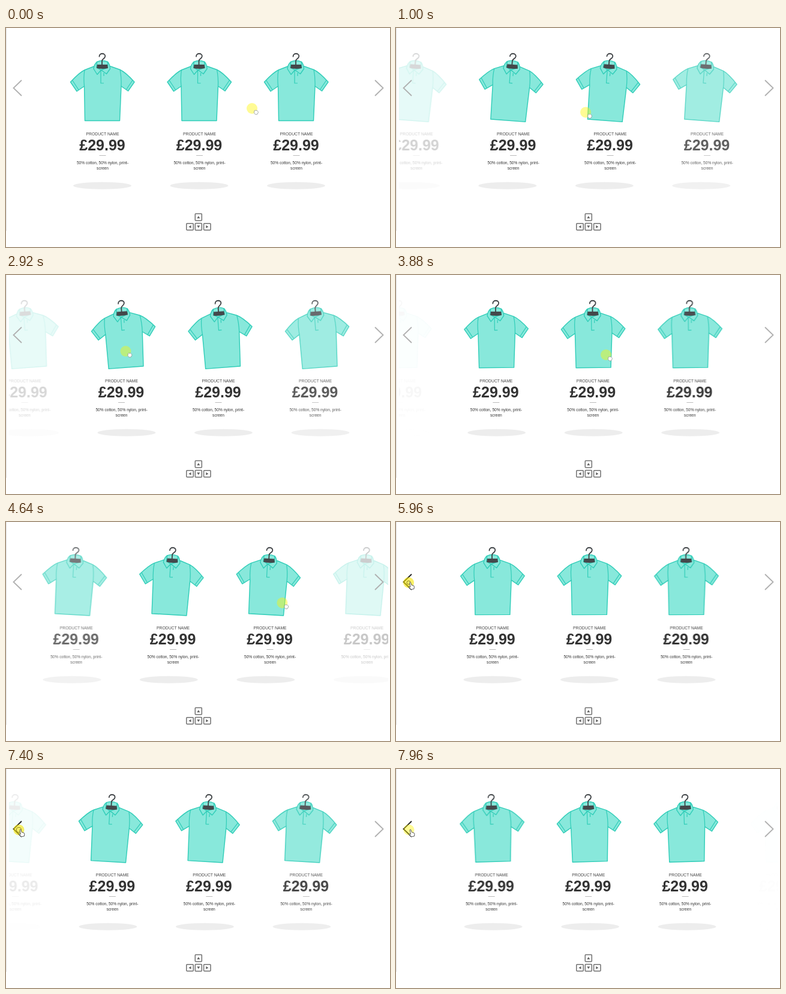
These frames come from a looping animation (640x365 px, 8000 ms). An HTML page:

```html
<!DOCTYPE html>
<html lang="en">
<head>
<meta charset="utf-8">
<title>Swinging product carousel</title>
<style>
  html, body { margin: 0; width: 100%; height: 100%; overflow: hidden; background: #fff; }
  svg { display: block; width: 640px; height: 365px; }
  text { font-family: "Liberation Sans", Arial, sans-serif; text-anchor: middle; fill: #333; }
  .name { font-size: 6.8px; fill: #444; }
  .price { font-size: 25px; font-weight: bold; }
  .note { font-size: 6.6px; }
  .shirt path { fill: #88e8db; stroke: #30cdb8; stroke-width: 1.4; stroke-linejoin: round; }
  .shirt .seam { fill: none; stroke-width: 1.2; }
  .shirt .bar { fill: #44484b; stroke: none; }
  .shirt .hook { fill: none; stroke: #3f4346; stroke-width: 1.8; stroke-linecap: round; }
  .arrow { fill: none; stroke: #b0b0b0; stroke-width: 1.8; }
  .key rect { fill: #fff; stroke: #707070; stroke-width: 1.5; }
  .key path { fill: #606060; }
  .hand { fill: #fff; stroke: #333; stroke-width: .8; stroke-linejoin: round; }
</style>
</head>
<body>
<svg viewBox="0 0 640 365">
  <defs>
    <clipPath id="stage"><rect x="5" y="0" width="632" height="300"/></clipPath>
    <!-- Coordinates are relative to the centre line of one product -->
    <g id="shirt" class="shirt">
      <path d="M-14 64L-29.500 70Q-38 74-53 90L-42.500 105.500L-30 97L-29 154.500H29L31.500 97L43 105L53.500 90Q39 74 29.500 69.500L14 64Z"/>
      <path class="seam" d="M-29.500 70Q-31.500 82-30 97M29.500 69.500Q32 82 31.500 97M-50 87L-39.500 103M50.500 87L40 102.500"/>
      <path d="M-9 56.500Q0 52.500 9 56.500L10 70H-11Z"/>
      <path d="M-9 56.500Q-13.500 60-14.500 68L-8.500 77.500L-2 70L-9.500 66Z"/>
      <path d="M9 56.500Q12.500 60 13 68L7 76.500L-2 70L9 66Z"/>
      <path class="bar" d="M-8.500 61H8.500L9.500 67Q0 69-9.500 67Z"/>
      <path class="hook" d="M-5 47.500C-5 41 5 41.500 4.800 47C4.500 51.500-.5 51-.5 55V61"/>
      <path class="seam" d="M-2.500 71V92H2.500M2.500 75V80"/>
    </g>
    <g id="label">
      <text class="name" x=".5" y="179">PRODUCT NAME</text>
      <text class="price" y="204">£29.99</text>
      <path d="M-5 212.500H6" stroke="#bbb"/>
      <text class="note" x=".5" y="227.300">50% cotton, 50% nylon, print-</text>
      <text class="note" x=".5" y="236.300">screen</text>
    </g>
    <g id="key" class="key">
      <rect x="-5.500" y="-5.700" width="11" height="11.400" rx="1"/>
      <path d="M-2.500 2L0-2L2.500 2Z"/>
    </g>
  </defs>

  <path d="M.5 0V338" stroke="#e2e2e2"/>
  <g id="items" clip-path="url(#stage)"></g>
  <use href="#key" transform="translate(320.800 315.300)"/>
  <use href="#key" transform="translate(306.500 331.200) rotate(-90)"/>
  <use href="#key" transform="translate(320.800 331.200) rotate(180)"/>
  <use href="#key" transform="translate(335.300 331.200) rotate(90)"/>
  <path id="prev" class="arrow" d="M26 87L12.500 100L26 113"/>
  <path class="arrow" d="M615 87L628.500 100L615 113"/>
  <g id="pointer">
    <circle id="halo" r="9"/>
    <circle id="ring" fill="none" stroke="#7d7420" stroke-width=".9"/>
    <path id="finger" class="hand" d="M1.500 0Q2.500-1.300 3.500 0L4.800 4L8.500 5Q10 6 9 10.500L4 11.500L0 7Q0 5.500 3 7.500Z"/>
    <path id="fist" class="hand" style="stroke:#8b9494" d="M4 4Q5 2.500 6.500 3.500Q8.500 2.500 9.500 4.500L10.500 6.500L8.500 10H5.500L3.500 7.500Z"/>
  </g>
</svg>
<script>
const LOOP = 8000, GAP = 161.5, FIRST = 160.5;
const SWING = { perPixel: .05, period: 960, decay: 450 };
const $ = id => document.getElementById(id);
const clamp = v => Math.max(0, Math.min(1, v));

const slide = at => ({ at, time: 740, way: GAP });
const moves = [
  slide(880),
  { at: 2100, time: 460, way: -43 },            // slow drag to the left
  { at: 2580, time: 340, way: -248.5 },         // quick flick
  { at: 3440, time: 860, way: 291.5 - 2 * GAP },  // release: snap to the next slot
  slide(4320), slide(5964), slide(7324)
];
const clicks = [5920, 7320];
const stops = [
  { at: 0, x: 410, y: 134 },
  { at: 880, x: 310, y: 140 },
  { at: 1840, x: 467.5, y: 150 },
  { at: 2560, x: 446, y: 140 },
  { at: 2920, x: 199.5, y: 127 },
  { at: 3440, x: 199, y: 128 },
  { at: 3880, x: 350, y: 133 },
  { at: 4900, x: 480, y: 135 },
  { at: 5800, x: 21, y: 101 },
  { at: LOOP, x: 21.5, y: 101.5 }
];

// The standard CSS "ease" curve
function ease(p) {
  if (p <= 0 || p >= 1) return clamp(p);
  const bezier = (u, a, b) => 3 * u * (1 - u) * ((1 - u) * a + u * b) + u ** 3;
  let lo = 0, hi = 1;
  for (let i = 0; i < 20; i++) {
    const mid = (lo + hi) / 2;
    if (bezier(mid, .25, .25) < p) lo = mid; else hi = mid;
  }
  return bezier(lo, .1, 1);
}

const sumMoves = effect => moves.reduce((sum, move) => sum + effect(move), 0);

// Every move kicks the hangers, which then swing like damped pendulums
function kick(age, way) {
  if (age < 0) return 0;
  return SWING.perPixel * way * Math.exp(-age / SWING.decay) *
    Math.sin(2 * Math.PI * age / SWING.period);
}

const items = [-1, 0, 1, 2].map(slot => {
  const group = document.createElementNS("http://www.w3.org/2000/svg", "g");
  group.innerHTML = `<ellipse cy="262.7" rx="48.5" ry="6" fill="#ededed"/>
    <use href="#shirt"/><use href="#label"/>`;
  $("items").append(group);
  const [shadow, shirt] = group.children;
  return { slot, group, shadow, shirt };
});

function drawItems(t) {
  const total = sumMoves(({ at, time, way }) => way * ease((t - at) / time));
  const tilt = sumMoves(({ at, way }) => kick(t - at, way));
  const shift = ((total + .01) % GAP + GAP) % GAP;
  const part = shift / GAP;
  for (const { slot, group, shadow, shirt } of items) {
    group.setAttribute("transform", `translate(${FIRST + slot * GAP + shift} 0)`);
    group.setAttribute("opacity", slot < 0 ? part : slot > 1 ? 1 - part : 1);
    shirt.setAttribute("transform", `rotate(${tilt} 0 46)`);
    shadow.setAttribute("cx", -2.1 * tilt);
  }
}

function pointerAt(t) {
  const i = stops.findIndex(stop => stop.at > t);
  const a = stops[i - 1], b = stops[i];
  const p = (1 - Math.cos(Math.PI * (t - a.at) / (b.at - a.at))) / 2;
  return { x: a.x + (b.x - a.x) * p, y: a.y + (b.y - a.y) * p };
}

function drawPointer(t) {
  const { x, y } = pointerAt(t);
  const hover = x < 32;
  const age = Math.min(...clicks.map(at => t >= at ? t - at : Infinity));
  const pressed = age < 260;
  const show = (id, on) => $(id).setAttribute("visibility", on ? "visible" : "hidden");
  $("pointer").setAttribute("transform", `translate(${x} ${y})`);
  $("halo").setAttribute("fill", pressed ? "rgba(246,230,0,.6)" : "rgba(255,246,0,.42)");
  $("ring").setAttribute("r", pressed ? 2 + age * .025 : 0);
  show("ring", pressed);
  show("finger", hover);
  show("fist", !hover);
  $("prev").style.stroke = hover ? "#222" : "";
}

function frame() {
  const t = performance.now() % LOOP;
  drawItems(t);
  drawPointer(t);
  requestAnimationFrame(frame);
}
frame();
</script>
</body>
</html>
```
